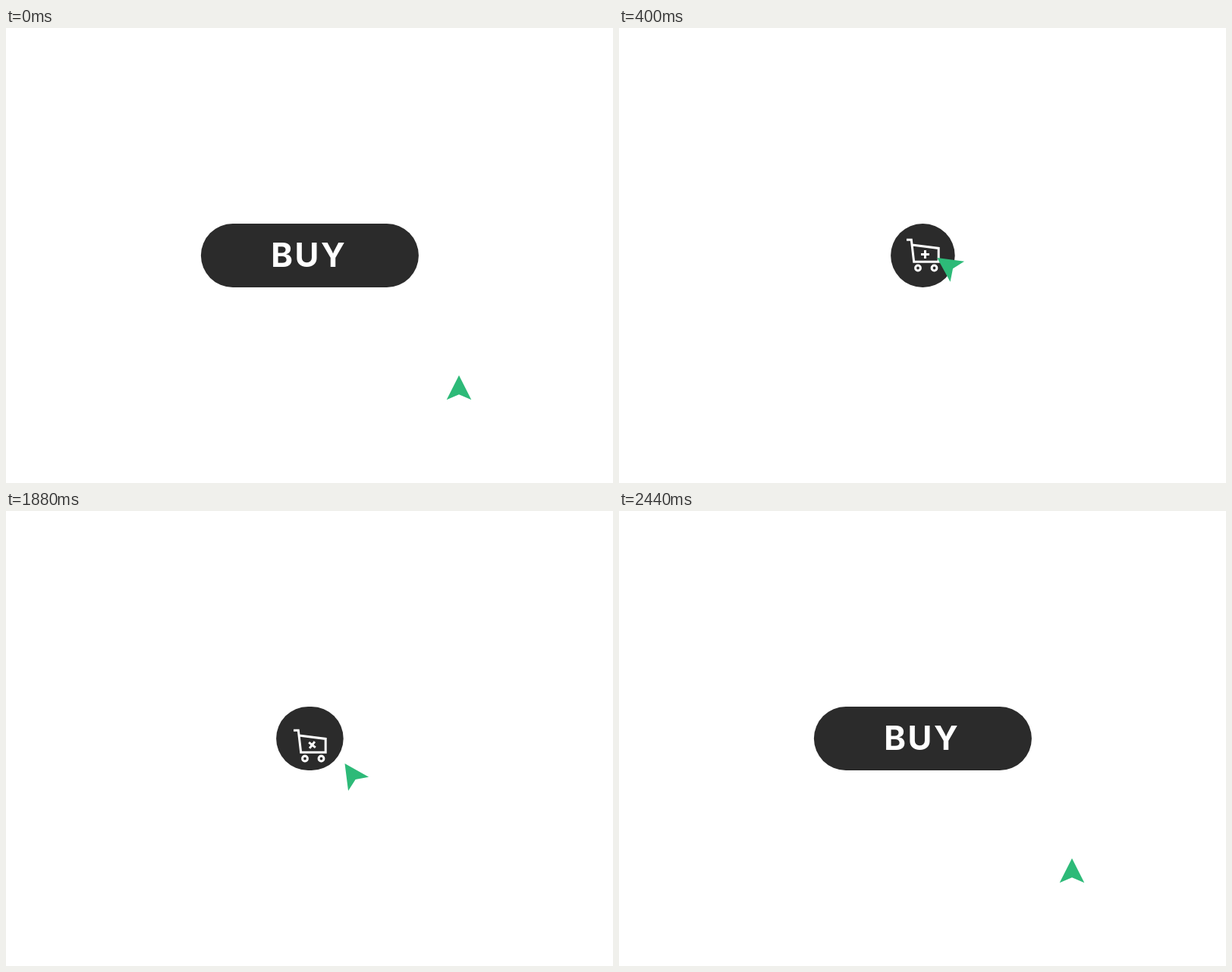
An HTML page with a canvas for the animation above (2.84 s loop, 800 by 600 pixels).

```html
<!DOCTYPE html>
<html lang="en">
<head>
<meta charset="utf-8">
<title>Buy button</title>
<style>
  html, body { margin: 0; width: 100%; height: 100%; overflow: hidden; background: #fff; }
  canvas { display: block; width: 800px; height: 600px; }
</style>
</head>
<body>
<canvas id="stage" width="800" height="600"></canvas>
<script>
const ctx = document.getElementById('stage').getContext('2d');
const LOOP = 2840, STEP = 40;
const DARK = '#2b2b2b', GREEN = '#2dba78';

// Smooth curve through [time, value] keys; flat at turning points and ends.
function track(...keys) {
  const rise = i => (keys[i + 1][1] - keys[i][1]) / (keys[i + 1][0] - keys[i][0]);
  const slope = keys.map((k, i) => {
    if (i === 0 || i === keys.length - 1) return 0;
    const a = rise(i - 1), b = rise(i);
    return a * b > 0 ? 2 * a * b / (a + b) : 0;
  });
  return t => {
    if (t <= keys[0][0]) return keys[0][1];
    const i = keys.findIndex(k => k[0] >= t) - 1;
    if (i < 0) return keys[keys.length - 1][1];
    const [t0, v0] = keys[i], [t1, v1] = keys[i + 1];
    const d = t1 - t0, u = (t - t0) / d, w = 1 - u;
    return v0 * w * w * (1 + 2 * u) + v1 * u * u * (3 - 2 * u)
      + d * u * w * (slope[i] * w - slope[i + 1] * u);
  };
}

const halfWidth = track([0, 143.5], [80, 156], [240, 60.4], [360, 42.3],
  [1800, 42.3], [1880, 44.3], [2030, 156], [2080, 143.5]);
const cartY = track([80, -90], [240, -10], [360, 0], [1680, 0], [1880, 10], [2000, 90]);
const plusTurn = track([1640, 0], [1880, 38], [2000, 90]);
const labelOut = track([20, 0], [220, 75]);
const labelIn = track([1900, -75], [2080, 0]);
const tipX = track([0, 597], [120, 497], [240, 421], [400, 419.2], [960, 418.6],
  [1600, 418.3], [1880, 446.5], [2080, 579], [2160, 597]);
const tipY = track([0, 458], [120, 392], [240, 302.5], [400, 303],
  [1600, 303], [1880, 333], [2080, 454], [2160, 462.3], [2400, 458]);
const turn = track([0, 0], [240, 53], [400, 55.5], [960, 56.5],
  [1600, 56.5], [1880, 34], [2080, 9], [2180, 0]);

function path(points, close) {
  ctx.beginPath();
  points.forEach(([x, y]) => ctx.lineTo(x, y));
  if (close) ctx.closePath();
}

function at(x, y, degrees, draw) {
  ctx.save();
  ctx.translate(x, y);
  ctx.rotate(degrees * Math.PI / 180);
  draw();
  ctx.restore();
}

function drawCart(angle) {
  ctx.strokeStyle = '#fff';
  ctx.lineWidth = 3;
  path([[379, 279.3], [385.3, 279.3], [388.7, 308.3], [421.2, 308.3], [421.2, 290.4], [386.2, 286]]);
  ctx.stroke();
  for (const x of [394, 415.5]) {
    ctx.beginPath();
    ctx.arc(x, 316.5, 3.4, 0, 7);
    ctx.stroke();
  }
  at(403.5, 298.5, angle, () => {
    ctx.fillStyle = '#fff';
    ctx.fillRect(-5.5, -1.5, 11, 3);
    ctx.fillRect(-1.5, -5.5, 3, 11);
  });
}

function drawLabel(dy) {
  ctx.font = '700 43.5px Inter, sans-serif';
  ctx.letterSpacing = '2.5px';
  ctx.fillStyle = '#fff';
  ctx.fillText('BUY', 349.3, 315.3 + dy);
}

function drawButton(t) {
  const w = halfWidth(t);
  ctx.save();
  ctx.beginPath();
  ctx.roundRect(400.4 - w, 258, 2 * w, 84, 42);
  ctx.fillStyle = DARK;
  ctx.fill();
  ctx.clip();
  drawLabel(t < 1000 ? labelOut(t) : labelIn(t));
  at(0, cartY(t), 0, () => drawCart(plusTurn(t)));
  ctx.restore();
}

function drawCursor(t) {
  at(tipX(t), tipY(t), -turn(t), () => {
    path([[0, 0], [16.3, 32.3], [0, 25.3], [-16.3, 32.3]], true);
    ctx.fillStyle = GREEN;
    ctx.fill();
  });
}

let start;
function frame(now) {
  start ??= now;
  const t = Math.floor((now - start) % LOOP / STEP) * STEP;
  ctx.fillStyle = '#fff';
  ctx.fillRect(0, 0, 800, 600);
  drawButton(t);
  drawCursor(t);
  requestAnimationFrame(frame);
}
requestAnimationFrame(frame);
</script>
</body>
</html>
```
